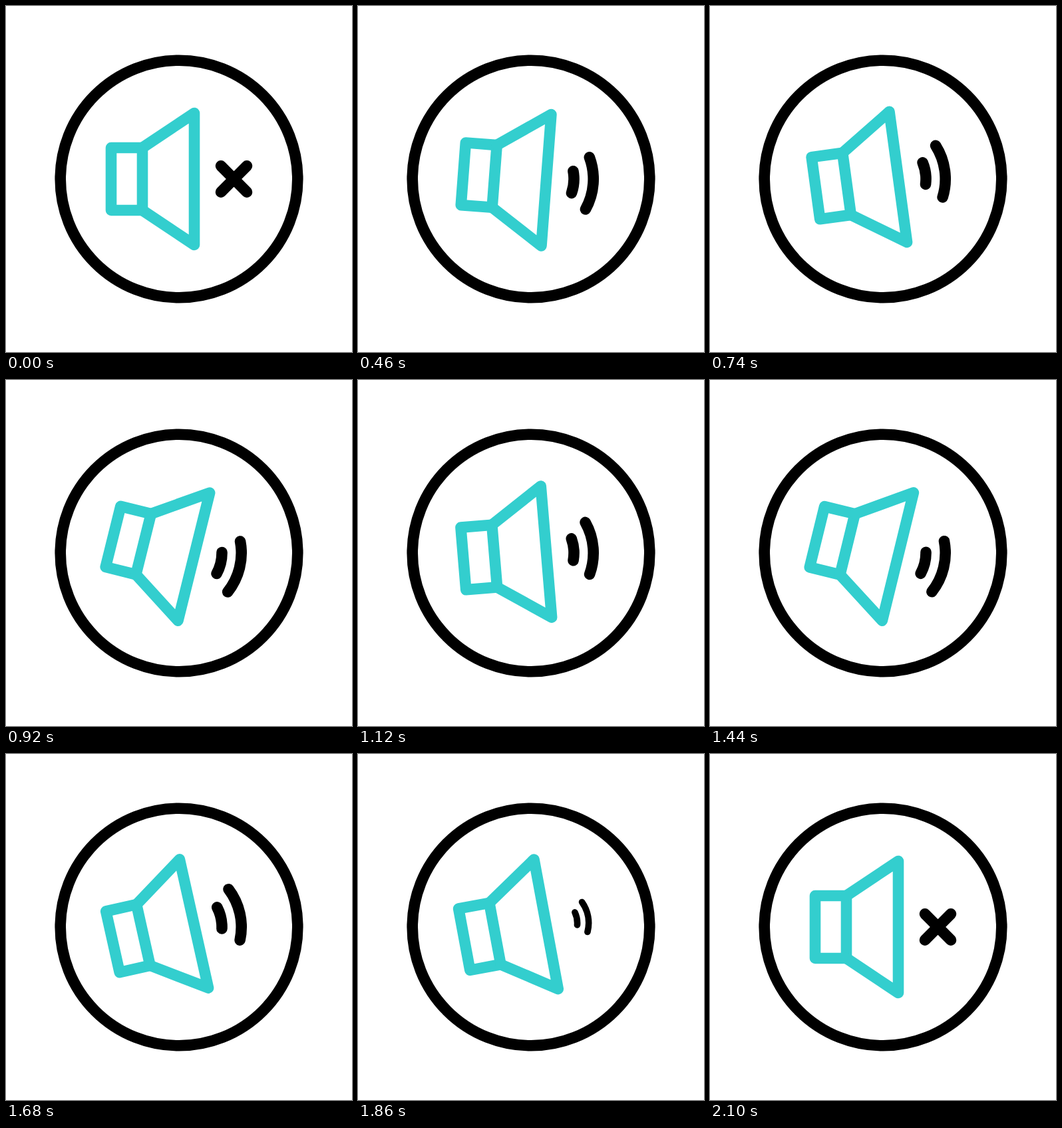
An HTML page that plays this animation: 520 px wide and 520 px high, repeating every 2420 ms.

```html
<!DOCTYPE html>
<html lang="en">
<head>
<meta charset="utf-8">
<title>Sound toggle</title>
<style>
  html, body { margin: 0; width: 100%; height: 100%; overflow: hidden; background: #fff; }
  svg { display: block; width: 100vw; height: 100vh; }
  svg * { fill: none; stroke-width: 16.6; stroke-linecap: round; stroke-linejoin: round; }
  .ink { stroke: #000; }
  .teal { stroke: #33cece; }
</style>
</head>
<body>
<svg viewBox="0 0 520 520">
  <circle class="ink" cx="260" cy="260" r="178.3"/>
  <g id="swing">
    <g class="teal">
      <path d="M158 213H205V307H158Z"/>
      <path d="M205 213L283 161V359L205 307"/>
    </g>
    <g id="cross" class="ink">
      <path d="M323 240.3L362 279.7M362 240.3L323 279.7"/>
    </g>
    <g id="waves" class="ink">
      <path id="near"/>
      <path id="far"/>
    </g>
  </g>
</svg>
<script>
  const LOOP = 2420, STEP = 20;
  const $ = id => document.getElementById(id);

  // Tables of [step, value]; each leg eases in and out.
  const ANGLE = [[5, 0], [17, 15], [31.9, -15], [47.8, 15], [61.3, -15], [73.5, 15], [86.2, -15], [105, 0]];
  const CROSS = [[5, 1], [13, 0], [96, 0], [105, 1]];
  const WAVES = [[11, 0], [20, 1], [89, 1], [98, 0]];

  function valueAt(keys, n) {
    if (n <= keys[0][0]) return keys[0][1];
    for (let i = 1; i < keys.length; i++) {
      const [a, from] = keys[i - 1], [b, to] = keys[i];
      if (n <= b) {
        const p = (n - a) / (b - a);
        return from + (to - from) * p * p * (3 - 2 * p);
      }
    }
    return keys[keys.length - 1][1];
  }

  // Arc centred on the stage, spread evenly around the horizontal.
  function arc(r, degrees) {
    const a = degrees * Math.PI / 180;
    const x = 260 + r * Math.cos(a), y = r * Math.sin(a);
    return `M${x} ${260 - y}A${r} ${r} 0 0 1 ${x} ${260 + y}`;
  }

  function zoom(el, scale, x) {
    el.style.display = scale > 0.01 ? "" : "none";
    el.setAttribute("transform", `translate(${x} 260) scale(${scale}) translate(${-x} -260)`);
  }

  $("near").setAttribute("d", arc(64.5, 14.8));
  $("far").setAttribute("d", arc(93.7, 24.7));

  const start = performance.now();
  function draw() {
    const t = Math.max(0, performance.now() - start) % LOOP;
    const n = Math.floor(t / STEP);
    $("swing").setAttribute("transform", `rotate(${valueAt(ANGLE, n)} 260 260)`);
    zoom($("cross"), valueAt(CROSS, n), 342.5);
    zoom($("waves"), valueAt(WAVES, n), 338);
    requestAnimationFrame(draw);
  }
  draw();
</script>
</body>
</html>
```
